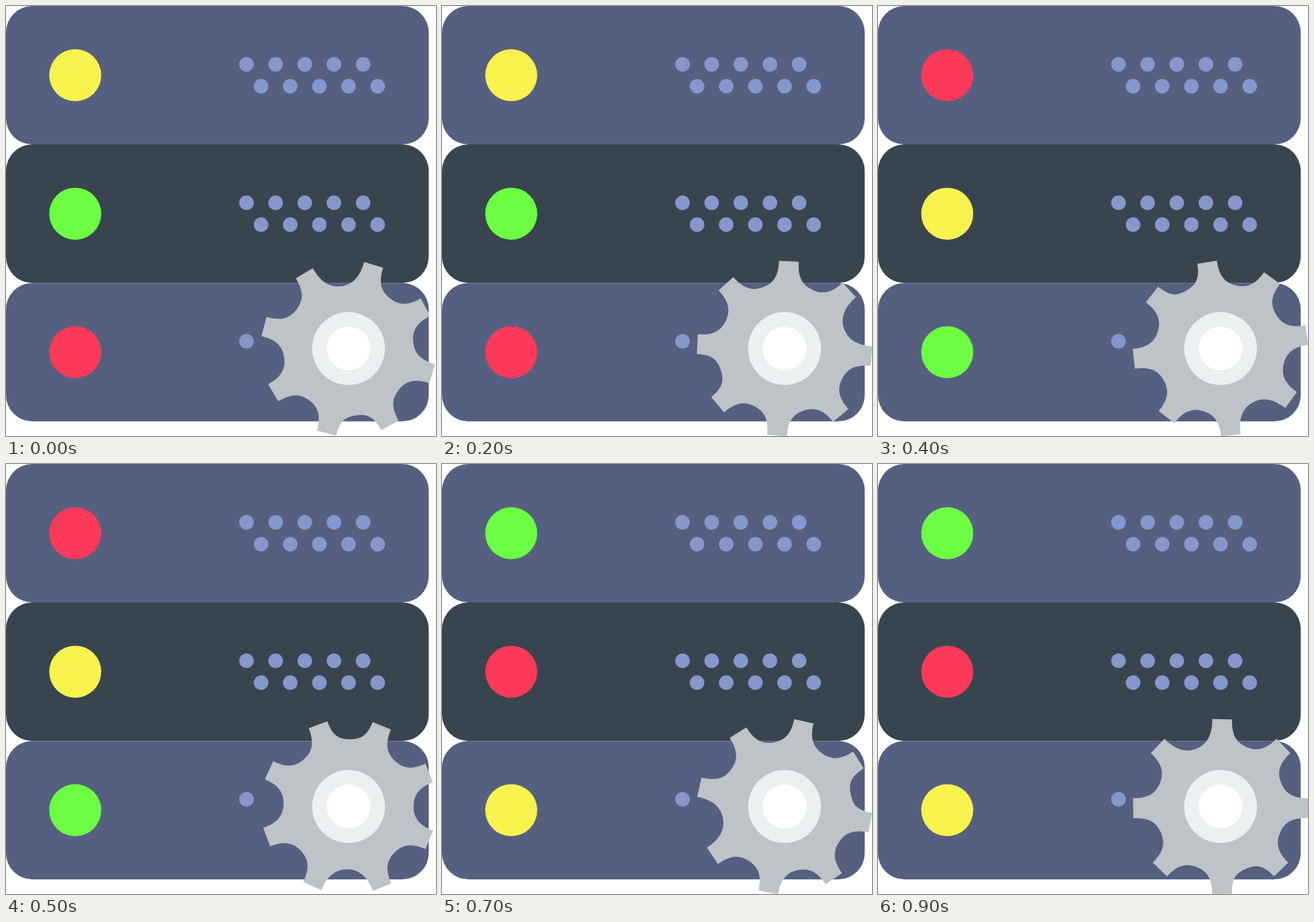
These frames come from a looping animation (640 by 640 pixels, 1000 ms). An HTML page:

```html
<!DOCTYPE html>
<html>
<head>
<meta charset="utf-8">
<style>
html, body { margin: 0; width: 100%; height: 100%; overflow: hidden; background: #fff; }
svg { display: block; width: 100vw; height: 100vh; }
</style>
</head>
<body>
<svg viewBox="0 0 59 59">
  <g id="rack"></g>
  <path id="gear" fill="#bdc3c7"/>
  <circle cx="47" cy="47" r="5" fill="#ecf0f1"/>
  <circle cx="47" cy="47" r="3" fill="#fff"/>
</svg>
<script>
const rack = document.getElementById('rack');
const gear = document.getElementById('gear');
const RAD = Math.PI / 180;
const LIGHTS = ['#f8f24f', '#6dfd43', '#fa3a58'];

function add(tag, attrs) {
  const el = document.createElementNS('http://www.w3.org/2000/svg', tag);
  for (const k in attrs) el.setAttribute(k, attrs[k]);
  return rack.appendChild(el);
}

const leds = [0, 1, 2].map(row => {
  const y = row * 19;
  add('rect', { y, width: 58, height: 19, rx: 3.608, fill: row === 1 ? '#38454f' : '#556080' });
  // the gear replaces most vents of the bottom row
  const vents = row === 2 ? 1 : 10;
  for (let i = 0; i < vents; i++) {
    const low = i > 4;
    add('circle', { cx: 33 + (i % 5) * 4 + (low ? 2 : 0), cy: y + (low ? 11 : 8), r: 1, fill: '#8697cb' });
  }
  return add('circle', { cx: 9.5, cy: y + 9.5, r: 3.57 });
});

// Eight teeth, slightly uneven: four lean one way, four the other.
const toothAngle = k => 45 * k + (k % 8 < 4 ? 1.06 : -1.06);

function gearPath() {
  let d = '';
  for (let k = 0; k < 8; k++) {
    const a = toothAngle(k), b = toothAngle(k + 1);
    const mid = (a + b) / 2 * RAD, half = ((b - a) / 2 - 6.45) * RAD;
    const pt = (x, y) =>
      (x * Math.cos(mid) + y * Math.sin(mid)).toFixed(3) + ',' +
      (x * Math.sin(mid) - y * Math.cos(mid)).toFixed(3) + ' ';
    const x = 12.06 * Math.sin(half), y = 12.06 * Math.cos(half);
    const cx = x - 0.67, cy = y - 1.63;
    const floor = 8.92 - 0.147 * (b - a - 45);
    d += (k ? 'L' : 'M') + pt(-x, y) +
      'C' + pt(-cx, cy) + pt(-1.84, floor) + pt(0, floor) +
      'C' + pt(1.84, floor) + pt(cx, cy) + pt(x, y);
  }
  return d + 'Z';
}
gear.setAttribute('d', gearPath());

function draw(now) {
  const step = Math.floor(now / 100) % 10;
  const turn = Math.floor(1 + 2.5 * step) * 360 / 23;
  gear.setAttribute('transform', `translate(47 47) rotate(${turn})`);
  const shift = Math.floor(step * 3 / 10);
  leds.forEach((led, row) => led.setAttribute('fill', LIGHTS[(row - shift + 3) % 3]));
}

let start;
function tick(now) {
  start ??= now;
  draw(now - start);
  requestAnimationFrame(tick);
}
draw(0);
requestAnimationFrame(tick);
</script>
</body>
</html>
```
